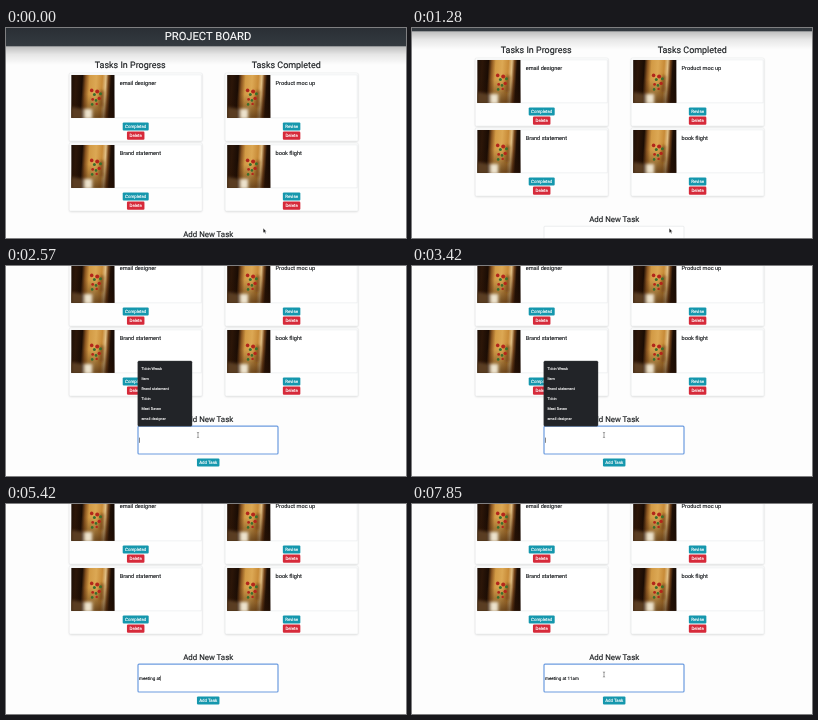
An HTML page that plays this animation: 400 by 210 pixels, repeating every 8 s.

```html
<!DOCTYPE html>
<html lang="en">
<head>
<meta charset="utf-8">
<title>Project board</title>
<style>
  html, body { margin: 0; width: 100%; height: 100%; overflow: hidden; background: #fdfdfd; }
  svg { display: block; width: 100vw; height: 100vh; }
  text { font-family: Roboto, sans-serif; text-rendering: geometricPrecision; white-space: pre; stroke-width: .14px; }
</style>
</head>
<body>
<svg id="stage" viewBox="0 0 400 210">
  <defs>
    <linearGradient id="bar" x2="0" y2="1">
      <stop stop-color="#292e34"/><stop offset="1" stop-color="#343a40"/>
    </linearGradient>
    <linearGradient id="shade" x2="0" y2="1">
      <stop stop-color="#000" stop-opacity=".26"/>
      <stop offset=".45" stop-color="#000" stop-opacity=".09"/>
      <stop offset="1" stop-color="#000" stop-opacity="0"/>
    </linearGradient>
    <linearGradient id="door" y2=".06">
      <stop stop-color="#1d0f06"/><stop offset=".12" stop-color="#2c1608"/>
      <stop offset=".26" stop-color="#1a0c04"/><stop offset=".34" stop-color="#8a5520"/>
      <stop offset=".43" stop-color="#d29a45"/><stop offset=".58" stop-color="#dca854"/>
      <stop offset=".72" stop-color="#c88b38"/><stop offset=".8" stop-color="#e0be84"/>
      <stop offset=".86" stop-color="#75451a"/><stop offset=".92" stop-color="#201006"/>
      <stop offset="1" stop-color="#150a04"/>
    </linearGradient>
    <linearGradient id="dusk" x2="0" y2="1">
      <stop offset=".45" stop-color="#2a1204" stop-opacity="0"/>
      <stop offset="1" stop-color="#2a1204" stop-opacity=".6"/>
    </linearGradient>
    <filter id="soft" x="-50%" y="-50%" width="200%" height="200%"><feGaussianBlur stdDeviation="1.5"/></filter>
    <filter id="glow" x="-10%" y="-10%" width="120%" height="125%"><feGaussianBlur stdDeviation="1"/></filter>
    <symbol id="photo" width="43.5" height="43" viewBox="0 0 43.5 43">
      <rect width="43.5" height="43" fill="url(#door)"/>
      <rect width="43.5" height="43" fill="url(#dusk)"/>
      <g filter="url(#soft)">
        <path d="M0 32L12 34V44H0z" fill="#5a3c20"/>
        <path d="M13 34h8v10h-8z" fill="#ece2cc"/>
        <path d="M29 15l4 1-1 16h-4z" fill="#6d3e14" opacity=".7"/>
      </g>
      <g fill="#b3261b">
        <circle cx="20.5" cy="15.5" r="1.8"/><circle cx="26" cy="16.5" r="2"/>
        <circle cx="28" cy="23.5" r="1.7"/><circle cx="21.5" cy="24.5" r="1.4"/><circle cx="25.5" cy="29" r="1.2"/>
      </g>
      <g fill="#3a6f2c">
        <circle cx="23.2" cy="19.5" r="1.5"/><circle cx="29.3" cy="18.8" r="1.5"/>
        <circle cx="24.8" cy="25.5" r="1.3"/><circle cx="21" cy="29.5" r="1.3"/>
      </g>
    </symbol>
  </defs>
  <rect width="400" height="210" fill="#fdfdfd"/>
  <g id="page"></g>
  <g id="popup"></g>
  <path id="arrow" d="M0 0v4.5l1.1-.9.8 1.7.8-.4-.8-1.6h1.4z" fill="#111" stroke="#fff" stroke-width=".35"/>
  <path id="beam" d="M-1.1-2.6Q0-2.6 0-1.9Q0-2.6 1.1-2.6M0-2V2M-1.1 2.6Q0 2.6 0 1.9Q0 2.6 1.1 2.6" fill="none" stroke="#444" stroke-width=".5"/>
</svg>
<script>
const $ = id => document.getElementById(id);
const LOOP = 8000, FPS = 7, STEPS = LOOP * FPS / 1000;
const TEAL = '#1597ad', RED = '#d62a3a', INK = '#16191c';

const text = (x, y, size, str, fill = INK, anchor = 'start') =>
  `<text x="${x}" y="${y}" font-size="${size}" fill="${fill}" stroke="${fill}" text-anchor="${anchor}">${str}</text>`;
const rect = (x, y, w, h, attrs) =>
  `<rect x="${x}" y="${y}" width="${w}" height="${h}" ${attrs}/>`;
const button = (cx, cy, w, fill, label) =>
  rect(cx - w / 2, cy - 4.1, w, 8.2, `rx="1.1" fill="${fill}"`) +
  text(cx, cy + 1.5, 4.4, label, '#fff', 'middle');

function card(x, y, title, action, w) {
  const cx = x + 66.5;
  return rect(x + .2, y + 1, 132.6, 67.6, 'rx="1" fill="#000" opacity=".14" filter="url(#glow)"') +
    rect(x, y, 133, 68, 'rx="1" fill="#fefefe" stroke="#e2e4e6" stroke-width=".5"') +
    rect(x + 2, y + 1.8, 130, 43, 'fill="#fff" stroke="#e6e8ea" stroke-width=".6"') +
    `<use href="#photo" x="${x + 2}" y="${y + 1.8}"/>` +
    text(x + 50.5, y + 12.3, 5.6, title) +
    button(cx, y + 53.4, w, TEAL, action) +
    button(cx, y + 62.6, 17.5, RED, 'Delete');
}

$('page').innerHTML =
  rect(0, 18, 400, 19, 'fill="url(#shade)"') +
  rect(0, -2, 400, 20.3, 'fill="url(#bar)"') +
  text(202, 12.2, 11.2, 'PROJECT BOARD', '#fff', 'middle') +
  text(124.2, 40.3, 8.95, 'Tasks In Progress', INK, 'middle') +
  text(280.2, 40.3, 8.95, 'Tasks Completed', INK, 'middle') +
  card(63.2, 45.1, 'email designer', 'Completed', 26) +
  card(63.2, 115.1, 'Brand statement', 'Completed', 26) +
  card(219.1, 45.1, 'Product moc up', 'Revise', 17.5) +
  card(219.1, 115.1, 'book flight', 'Revise', 17.5) +
  text(202.2, 208.8, 7.87, 'Add New Task', INK, 'middle') +
  rect(132, 213.2, 140, 27.8, 'id="field" rx="1" fill="#fff"') +
  `<text id="typed" x="133" y="228.6" font-size="4.5" fill="${INK}" stroke="${INK}"></text>` +
  rect(133, 224.6, .5, 5.2, 'id="caret" fill="#111"') +
  button(202.2, 249.5, 22.5, TEAL, 'Add Task');

const PHRASE = 'meeting at 11am';
const KEYS = [27, 28, 30, 31, 32, 33, 34, 35, 36, 38, 39, 41, 42, 43, 44];
const RECENT = ['Tobin Wresk', 'Item', 'Brand statement', 'Tobin', 'Meet Daven', 'email designer'];
const MATCHES = ['Meet Daven', 'Meeting @ 11am'];
const SCROLL = [0, 2.4, 15, 34, 48.3, 52, 53];
const FOCUS = 17, OPEN = 18, POINTER_BACK = 49, BLINK = 3.5;

const clamp = (v, lo, hi) => Math.min(hi, Math.max(lo, v));

function suggestions(step, count) {
  if (step < OPEN) return [];
  if (!count) return RECENT;
  return MATCHES.filter(s => s.toLowerCase().startsWith(PHRASE.slice(0, count)));
}

function drawPopup(list) {
  const h = list.length * 10.1 + 4.6, top = 160.2 - h;
  $('popup').innerHTML = !list.length ? '' :
    rect(131.8, top, 54.2, h, 'rx="1.2" fill="#222428" stroke="#3b3d40" stroke-width=".4"') +
    list.map((s, i) => text(135.4, top + 8.5 + i * 10.1, 3.72, s, '#f2f2f2')).join('');
}

function place(id, x, y, shown) {
  $(id).setAttribute('transform', `translate(${x} ${y})`);
  $(id).setAttribute('visibility', shown ? 'visible' : 'hidden');
}

function draw(step) {
  const count = KEYS.filter(k => k <= step).length;
  const focused = step >= FOCUS;
  $('page').setAttribute('transform', `translate(0 ${-SCROLL[clamp(step - 7, 0, 6)]})`);
  $('field').setAttribute('stroke', focused ? '#6c9ce0' : '#e2e5e7');
  $('field').setAttribute('stroke-width', focused ? 1.2 : .7);

  // the caret's blink restarts with every key
  const since = step - (count ? KEYS[count - 1] : FOCUS);
  const lit = focused && Math.floor(since / BLINK) % 2 === 0;
  $('typed').textContent = PHRASE.slice(0, count);
  $('caret').setAttribute('visibility', lit ? 'visible' : 'hidden');
  $('caret').setAttribute('x', 133 + (count ? $('typed').getComputedTextLength() + .1 : 0));
  drawPopup(suggestions(step, count));

  // arrow travels to the field, where it becomes a text cursor
  const u = clamp((step - 12) / 4, 0, 1), e = u * u * (3 - 2 * u);
  const x = 257.2 - 65.2 * e, y = 200.3 - 31.3 * e;
  const inField = step > 14, back = step >= POINTER_BACK;
  place('arrow', x, y, !inField);
  place('beam', x, back ? 170.5 : y, inField && (step < KEYS[0] || back));
}

let last = -1;
function tick(now) {
  const t = now % LOOP;
  const step = Math.min(STEPS - 1, Math.floor((t + 10) * FPS / 1000));
  if (step !== last) draw(last = step);
  requestAnimationFrame(tick);
}
draw(0);
requestAnimationFrame(tick);
</script>
</body>
</html>
```
